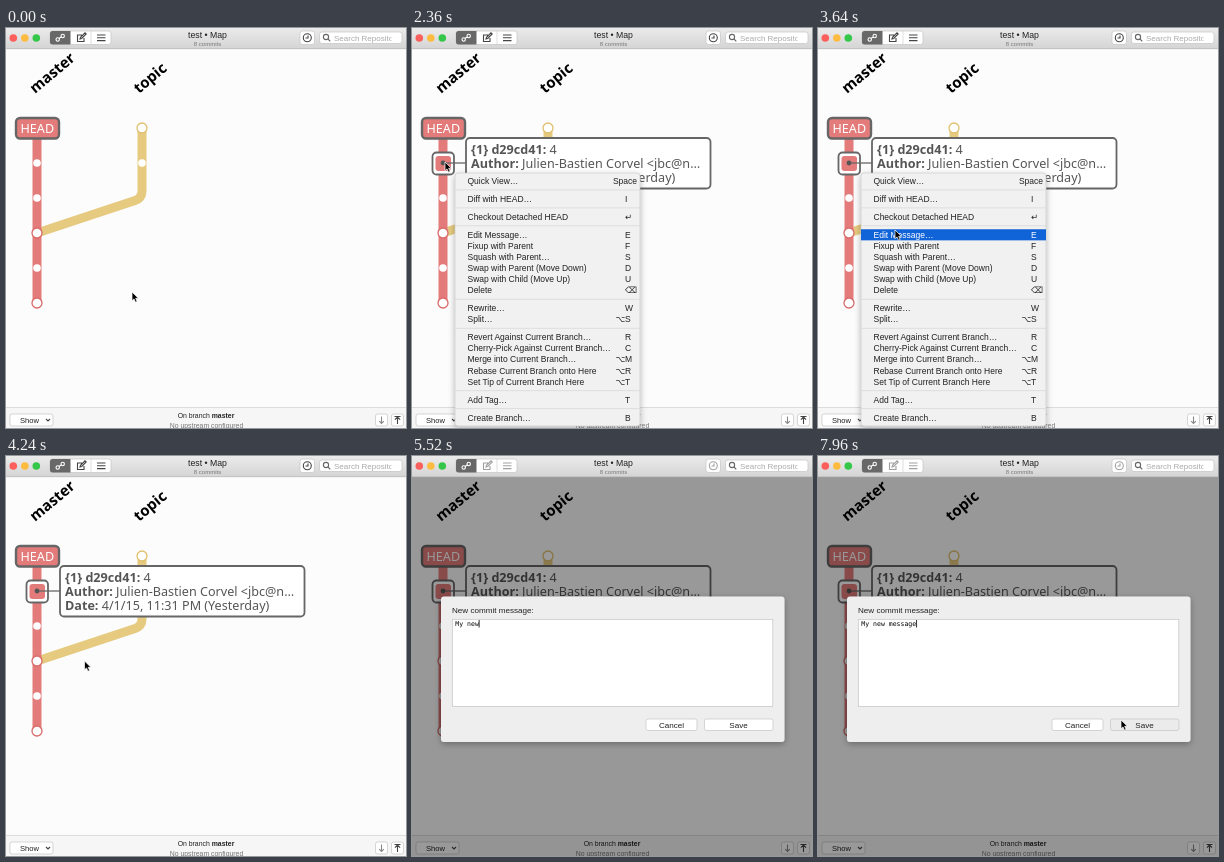
Write an HTML page that moves like this. It is 400 px wide and 400 px high and loops after 8 s.

```html
<!DOCTYPE html>
<html lang="en">
<head>
<meta charset="utf-8">
<title>Commit map</title>
<style>
  html, body { margin: 0; width: 100%; height: 100%; overflow: hidden; background: #fcfcfc; }
  svg { display: block; width: 100vw; height: 100vh; font: 8.5px "Liberation Sans", Arial, sans-serif; fill: #222; }
  .map { font: 12.6px "Noto Sans", "Open Sans", sans-serif; }
  .branch { font-size: 15px; font-weight: bold; fill: #000; }
  .mid { text-anchor: middle; }
  .small { font-size: 6.9px; }
  .ui { font-size: 8.1px; }
  .box { fill: #fff; stroke: #c4c4c4; stroke-width: .7; }
  .frame { fill: #fff; stroke: #666; stroke-width: 1.8; }
  .icon { fill: none; stroke: #444; stroke-width: 1.1; }
  .mono { font: 6.52px "DejaVu Sans Mono", monospace; fill: #000; white-space: pre; }
</style>
</head>
<body>
<svg viewBox="0 0 400 400">
  <defs>
    <linearGradient id="bar" x2="0" y2="1">
      <stop stop-color="#ebebeb"/><stop offset="1" stop-color="#d4d4d4"/>
    </linearGradient>
    <clipPath id="searchClip"><path d="M326 3h59.500v14h-59.500z"/></clipPath>
    <filter id="shadow" x="-10%" y="-10%" width="120%" height="120%">
      <feDropShadow dx="0" dy="2" stdDeviation="3" flood-opacity=".3"/>
    </filter>
  </defs>
  <rect width="400" height="400" fill="#fcfcfc"/>

  <g class="map">
    <text class="branch" transform="translate(29 66) rotate(-40)">master</text>
    <text class="branch" transform="translate(133 66) rotate(-40)">topic</text>
    <path d="M31 205L129 172.500Q136 170 136 163V100" fill="none" stroke="#e5ca80" stroke-width="9"/>
    <path d="M31 100V275" stroke="#e37b7b" stroke-width="9"/>
    <g id="nodes" fill="#fff" stroke-width="1.3"></g>
    <rect class="frame" x="10" y="90" width="43" height="20.500" rx="4" style="fill:#e37b7b;stroke-width:2.4"/>
    <text class="mid" x="31.300" y="105" fill="#fff">HEAD</text>
    <g id="tip">
      <rect class="frame" x="20.500" y="124.500" width="21.500" height="22" rx="4"/>
      <rect x="23.500" y="128" width="15.500" height="15" rx="3" fill="#e37b7b"/>
      <path d="M31 135H54" stroke="#666" stroke-width="1.300"/>
      <circle cx="31" cy="135" r="2.400" fill="#555"/>
      <rect class="frame" x="54" y="110" width="244.500" height="50.500" rx="4"/>
      <g fill="#555">
        <text x="59" y="126"><tspan font-weight="bold">{1} d29cd41:</tspan> 4</text>
        <text x="59" y="140"><tspan font-weight="bold">Author:</tspan> Julien-Bastien Corvel &lt;jbc@n…</text>
        <text x="59" y="154"><tspan font-weight="bold">Date:</tspan> 4/1/15, 11:31 PM (Yesterday)</text>
      </g>
    </g>
  </g>

  <path d="M0 379.500H400V400H0z" fill="#f6f6f6"/>
  <path d="M0 379.500H400" stroke="#dcdcdc"/>
  <rect class="box" x="4" y="386" width="43" height="12" rx="2"/>
  <text x="14" y="395" style="font-size:7.6px">Show</text>
  <path class="icon" d="M40 391l2 2 2-2"/>
  <g class="mid small">
    <text x="200" y="390.300">On branch <tspan font-weight="bold">master</tspan></text>
    <text x="200.500" y="399.600" fill="#777">No upstream configured</text>
  </g>
  <rect class="box" x="369.500" y="386" width="12" height="12" rx="2"/>
  <rect class="box" x="385.500" y="386" width="12" height="12" rx="2"/>
  <path class="icon" d="M375.500 388.500v7m-2.300-2.300l2.300 2.300 2.300-2.300" style="stroke:#888"/>
  <path class="icon" d="M391.500 396v-7m-2.600 2.600l2.600-2.600 2.600 2.600M388.500 388.500h6"/>

  <rect id="dim" y="21" width="400" height="379" opacity=".4" fill="#000"/>

  <path d="M0 0H400V21H0z" fill="url(#bar)"/>
  <path d="M0 20.700H400" stroke="#b8b8b8" stroke-width=".7"/>
  <circle cx="7.300" cy="10" r="3.800" fill="#fc605c"/>
  <circle cx="18.800" cy="10" r="3.800" fill="#fdbc40"/>
  <circle cx="30.300" cy="10" r="3.800" fill="#34c749"/>
  <rect class="box" x="44" y="3" width="61" height="13.500" rx="2.500"/>
  <path d="M64.500 3V16.500H46.500Q44 16.500 44 14V5.500Q44 3 46.500 3z" fill="#686868"/>
  <path d="M85 3V16.500" stroke="#d0d0d0" stroke-width=".7"/>
  <g class="icon" stroke="#fff" style="stroke:#fff">
    <circle cx="51.700" cy="11.500" r="1.700"/><circle cx="56.700" cy="8" r="1.700"/>
    <path d="M53 10.500l2.300-1.600"/>
  </g>
  <rect class="box" x="294" y="3" width="14.500" height="13.500" rx="2.500"/>
  <g id="tools" class="icon">
    <path d="M76 7h-4.500v6.500h6.500V10M74 11l.5-1.700 4.500-4.500 1.200 1.200-4.500 4.500z"/>
    <path d="M91 7h8.500M91 9.800h8.500M91 12.600h8.500"/>
    <circle cx="301.300" cy="9.800" r="4"/><path d="M302 7.500v2.500h-2.500"/>
  </g>
  <text class="mid" x="201.500" y="9.700" style="font-size:8.7px">test • Map</text>
  <text class="mid" x="201.500" y="17.700" fill="#777" style="font-size:6px">8 commits</text>
  <rect class="box" x="313.500" y="4" width="82.500" height="11.500" rx="2.500"/>
  <g class="icon" style="stroke:#666"><circle cx="320" cy="9" r="2.600"/><path d="M322 11l2.300 2.300"/></g>
  <text x="328" y="12.700" fill="#aaa" clip-path="url(#searchClip)" style="font-size:8px">Search Repository</text>

  <g id="menu">
    <rect x="43" y="145" width="185" height="253" rx="3" fill="#f1f1f1" stroke="#bbb" stroke-width=".5" filter="url(#shadow)"/>
    <rect id="highlight" x="43" width="185" height="11.100" fill="#1163d8"/>
    <g id="items"></g>
  </g>

  <g id="sheet" class="ui">
    <rect x="29" y="140.500" width="343.500" height="145.500" rx="3" fill="#eee" filter="url(#shadow)"/>
    <text x="40" y="157">New commit message:</text>
    <rect class="box" x="40.300" y="163.300" width="320.500" height="87"/>
    <text id="typed" class="mono" x="43.300" y="169.500"></text>
    <path id="caret" d="M0 164V171.500" stroke="#000" stroke-width=".8"/>
    <rect class="box" x="234" y="263" width="51" height="11.500" rx="2"/>
    <rect id="save" class="box" x="292.500" y="263" width="68.500" height="11.500" rx="2"/>
    <text class="mid" x="259.500" y="271.600">Cancel</text>
    <text class="mid" x="326.500" y="271.600">Save</text>
  </g>

  <path id="cursor" d="M0 0V8.700L2 6.900 3.500 10.200 5.100 9.500 3.700 6.300H6.400z" fill="#000" stroke="#fff" stroke-width=".7"/>
</svg>
<script>
const LOOP = 8000, ROW = 11.1, GAP = 6.85;
const $ = id => document.getElementById(id);
const show = (id, on) => $(id).style.display = on ? '' : 'none';
const smooth = u => u * u * (3 - 2 * u);

const node = (x, y, r, stroke) => `<circle cx="${x}" cy="${y}" r="${r}" stroke="${stroke}"/>`;
$('nodes').innerHTML =
  [135, 170, 240].map(y => node(31, y, 3.8, 'none')).join('') +
  [205, 275].map(y => node(31, y, 5, '#d96a6a')).join('') +
  node(136, 135, 3.8, 'none') + node(136, 100, 5, '#dfc06c');

// Groups are separated by "-"; each entry is label|shortcut.
const menuText = `Quick View…|Space
-
Diff with HEAD…|I
-
Checkout Detached HEAD|↵
-
Edit Message…|E
Fixup with Parent|F
Squash with Parent…|S
Swap with Parent (Move Down)|D
Swap with Child (Move Up)|U
Delete|⌫
-
Rewrite…|W
Split…|⌥S
-
Revert Against Current Branch…|R
Cherry-Pick Against Current Branch…|C
Merge into Current Branch…|⌥M
Rebase Current Branch onto Here|⌥R
Set Tip of Current Branch Here|⌥T
-
Add Tag…|T
-
Create Branch…|B`;

const items = [];
let top_ = 147.4;
for (const line of menuText.split('\n')) {
  if (line === '-') {
    const y = top_ + GAP / 2;
    $('items').insertAdjacentHTML('beforeend', `<path d="M43 ${y}H228" stroke="#d8d8d8" stroke-width=".8"/>`);
    top_ += GAP;
    continue;
  }
  const [label, key] = line.split('|'), y = top_ + 8.5;
  const option = key[0] === '⌥' ? `<text x="203.500" y="${y}">⌥</text>` : '';
  const keyText = key === 'Space'
    ? `<text x="225" y="${y}" text-anchor="end">Space</text>`
    : `<text x="213" y="${y}">${key.slice(-1)}</text>`;
  $('items').insertAdjacentHTML('beforeend', `<g><text x="55.500" y="${y}">${label}</text>${option}${keyText}</g>`);
  items.push({ top: top_, el: $('items').lastElementChild });
  top_ += ROW;
}

// time, x, y, easing towards this point
const path = [
  [0, 126, 264], [780, 126, 264], [1480, 59, 155], [1600, 47, 142], [1920, 33, 134],
  [2780, 33, 134], [3600, 77, 202, smooth], [3640, 77, 202], [3800, 78.5, 205],
  [6780, 78.5, 205], [7640, 303, 264, smooth], [LOOP, 303, 264]
];
function cursorAt(t) {
  const i = path.findIndex(p => p[0] > t);
  const [t0, x0, y0] = path[i - 1], [t1, x1, y1, ease = u => u] = path[i];
  const u = ease((t - t0) / (t1 - t0));
  return [x0 + (x1 - x0) * u, y0 + (y1 - y0) * u];
}

const message = 'My new message';
const keyTimes = [4440, 4840, 5160, 5280, 5400, 5520, 5600, 5720, 5800, 6040, 6120, 6280, 6360, 6560];

function draw(t) {
  const [x, y] = cursorAt(t);
  $('cursor').setAttribute('transform', `translate(${x} ${y})`);
  show('cursor', t < 4440 || t >= 6640);

  show('tip', t >= 2360);

  show('menu', t >= 1960 && t < 4240);
  $('menu').style.opacity = Math.min(1, Math.max(0, (4240 - t) / 320));
  const blinkOff = t >= 3720 && t < 3800;
  const active = x > 43 && !blinkOff ? items.find(i => y >= i.top && y < i.top + ROW) : null;
  show('highlight', active);
  if (active) $('highlight').setAttribute('y', active.top);
  for (const i of items) i.el.style.fill = i === active ? '#fff' : '';

  const open = t >= 4280;
  show('dim', open);
  show('sheet', open);
  $('tools').style.opacity = open ? .5 : 1;
  const count = keyTimes.filter(k => k <= t).length;
  $('typed').textContent = message.slice(0, count);
  $('caret').setAttribute('transform', `translate(${43.6 + count * 3.925} 0)`);
  show('caret', t < 7120 || t >= 7640);
  $('save').style.fill = t >= 7960 ? '#ebebeb' : '';
}

function tick() {
  draw(performance.now() % LOOP);
  requestAnimationFrame(tick);
}
tick();
</script>
</body>
</html>
```
